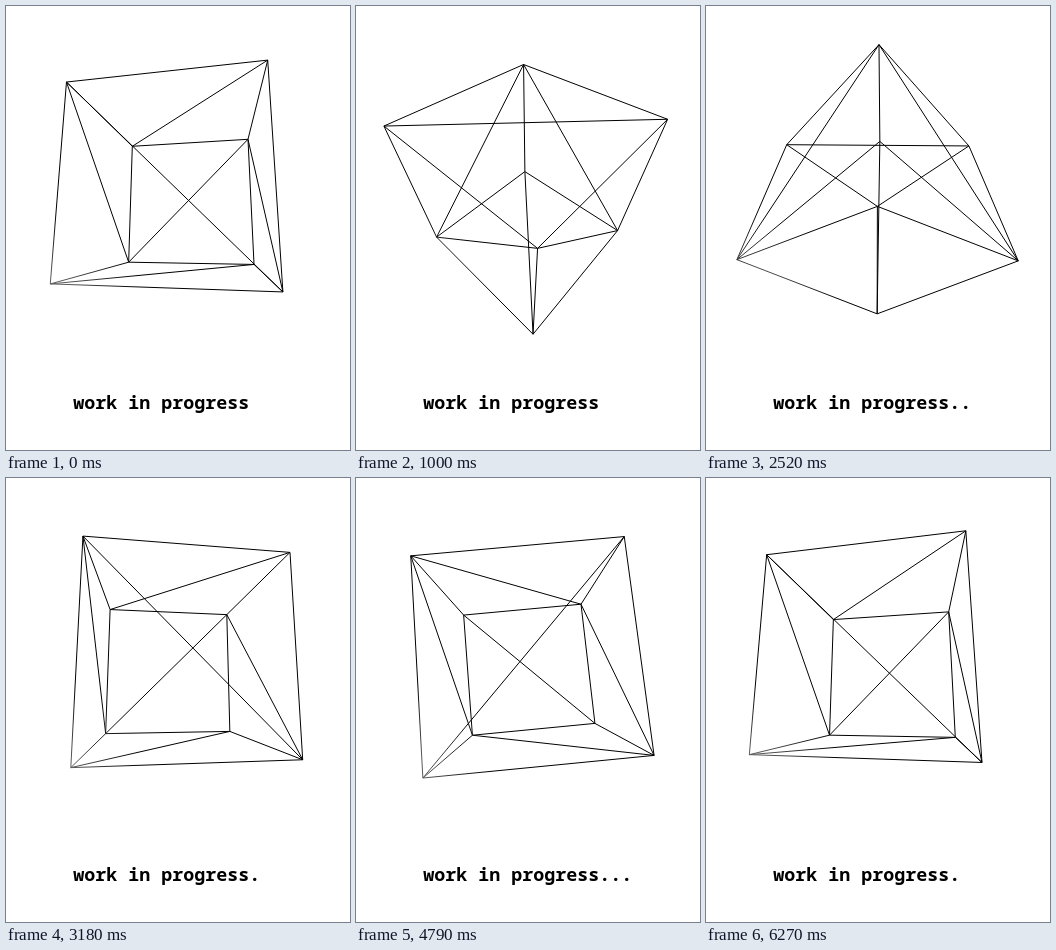
Recreate the animation shown at these times as an HTML page. Size 344x444 px, loop 6300 ms.

```html
<!DOCTYPE html>
<html lang="en">
<head>
<meta charset="utf-8">
<title>work in progress</title>
<style>
  html, body { margin: 0; height: 100%; overflow: hidden; background: #fff; }
  svg { display: block; }
  path { fill: none; stroke: url(#ink); stroke-width: 1; }
  text { font: 600 18.33px "Noto Sans Mono", "DejaVu Sans Mono", monospace; }
</style>
</head>
<body>
<svg width="344" height="444" viewBox="0 0 344 444">
  <defs>
    <radialGradient id="ink" gradientUnits="userSpaceOnUse" cx="45" cy="295" r="90">
      <stop offset="0" stop-color="#777"/>
      <stop offset="1" stop-color="#000"/>
    </radialGradient>
  </defs>
  <path id="cube"/>
  <text id="label" x="67.2" y="403">work in progress</text>
</svg>
<script>
const LOOP = 6300;
const FOCAL = 200 / Math.tan(37.5 * Math.PI / 180);
const DISTANCE = 10 / 3;
const CENTER = { x: 172, y: 184.5 };
const cube = document.getElementById('cube');
const label = document.getElementById('label');

// Corner index bits give the signs of x, y and z.
const corners = [...Array(8).keys()].map(i => [0, 1, 2].map(b => (i >> b & 1) * 2 - 1));

// One diagonal per face, then the twelve edges.
const lines = [[6, 5], [0, 3], [7, 2], [6, 0], [4, 1], [3, 5]];
for (let i = 0; i < 8; i++)
  for (const bit of [1, 2, 4])
    if (!(i & bit)) lines.push([i, i | bit]);

// Turn about y, then about x by the same angle, then project.
function project([x, y, z], angle) {
  const c = Math.cos(angle), s = Math.sin(angle);
  const depth = z * c - x * s;
  const scale = FOCAL / (DISTANCE - y * s - depth * c);
  const px = CENTER.x + (x * c + z * s) * scale;
  const py = CENTER.y - (y * c - depth * s) * scale;
  return px.toFixed(2) + ' ' + py.toFixed(2);
}

function draw(now) {
  const t = now % LOOP;
  const points = corners.map(p => project(p, t / 1000 - 0.173));
  cube.setAttribute('d', lines.map(([a, b]) => `M${points[a]}L${points[b]}`).join(''));
  const dots = Math.floor((t + 115) / 250) % 4;
  label.textContent = 'work in progress' + '.'.repeat(dots);
}

const start = performance.now();
function tick() {
  draw(performance.now() - start);
  requestAnimationFrame(tick);
}
tick();
</script>
</body>
</html>
```
